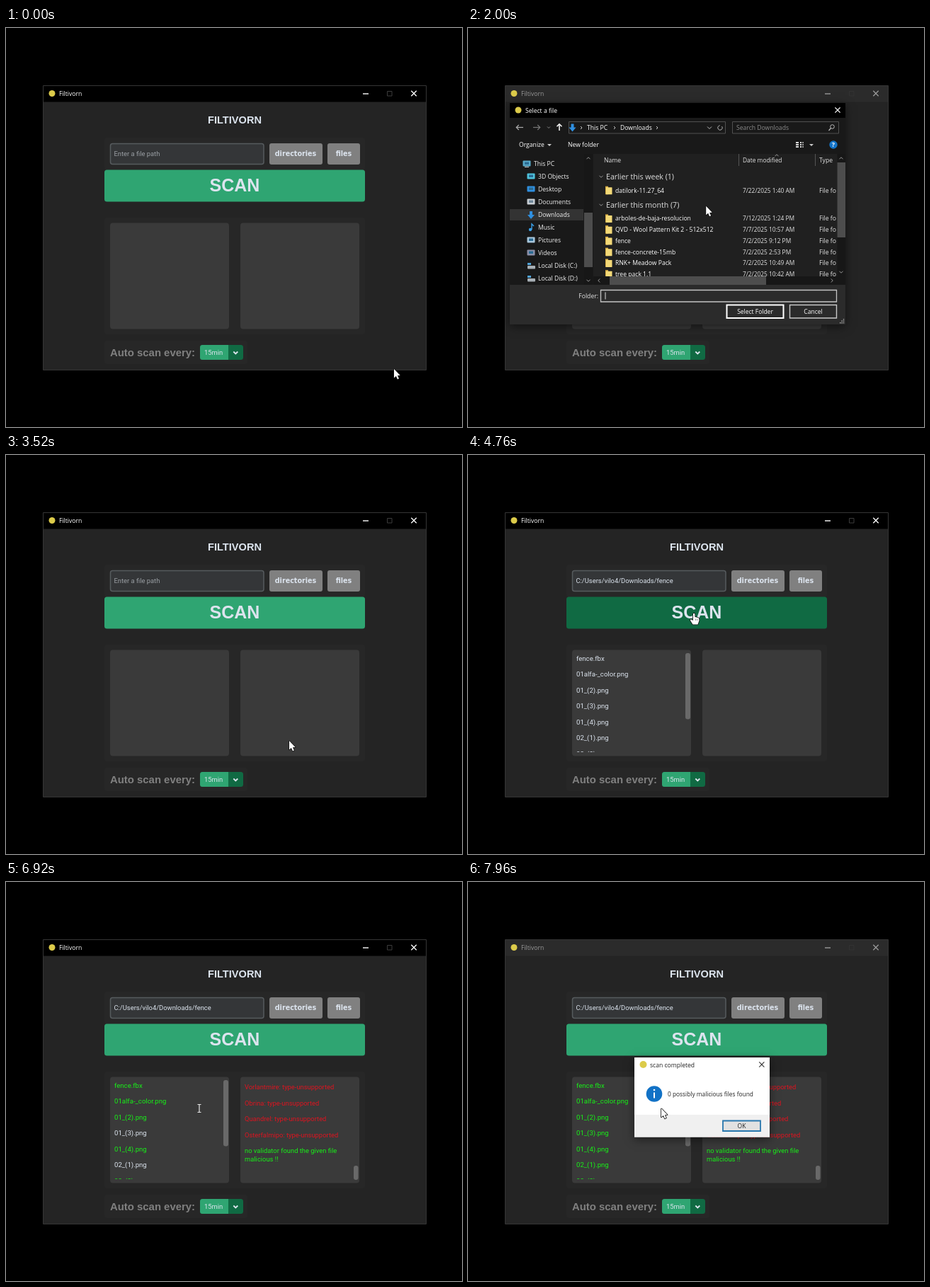
Recreate the animation shown at these times as an HTML page with a canvas. Size 644 by 564 pixels, loop 8000 ms.

```html
<!DOCTYPE html>
<html lang="en">
<head>
<meta charset="utf-8">
<style>
html, body { margin: 0; width: 100%; height: 100%; overflow: hidden; background: #000; }
canvas { display: block; }
</style>
</head>
<body>
<canvas id="stage" width="644" height="564"></canvas>
<script>
const LOOP = 8000, W = 644, H = 564;
const stage = document.getElementById('stage').getContext('2d');
const layer = Object.assign(document.createElement('canvas'), { width: W, height: H }).getContext('2d');
let g = stage;

const APP = '"Roboto", sans-serif';
const HEAD = '"Liberation Sans", Arial, sans-serif';
const WIDE = '"DejaVu Sans", Verdana, sans-serif';
const UI = '"Open Sans", "Noto Sans", sans-serif';
const GREEN = '#2fa572', DARK_GREEN = '#106a43', PALE = '#dce4ee';
const OK_TEXT = '#18f018', BAD_TEXT = '#dc1420';

const clamp = v => Math.max(0, Math.min(1, v));
const smooth = p => p * p * (3 - 2 * p);
const easeOut = p => 1 - (1 - p) ** 3;
const progress = (t, start, length) => clamp((t - start) / length);

function box(x, y, w, h, fill, radius = 0, stroke, line = 1) {
  g.beginPath();
  g.roundRect(x, y, w, h, radius);
  if (fill) { g.fillStyle = fill; g.fill(); }
  if (stroke) { g.strokeStyle = stroke; g.lineWidth = line; g.stroke(); }
}
function text(s, x, y, size, color, family = UI, align = 'left', weight = 400) {
  g.font = `${weight} ${size}px ${family}`;
  g.fillStyle = color;
  g.textAlign = align;
  g.textBaseline = 'alphabetic';
  g.fillText(s, x, y + size * 0.355);
}
function path(points, color, width = 1, fill) {
  g.beginPath();
  points.forEach(([x, y]) => g.lineTo(x, y));
  if (fill) { g.closePath(); g.fillStyle = fill; g.fill(); }
  if (color) { g.strokeStyle = color; g.lineWidth = width; g.stroke(); }
}
function disc(x, y, r, color) {
  g.beginPath();
  g.arc(x, y, r, 0, Math.PI * 2);
  g.fillStyle = color;
  g.fill();
}
function cross(x, y, r, color, width = 1.2) {
  path([[x - r, y - r], [x + r, y + r]], color, width);
  path([[x + r, y - r], [x - r, y + r]], color, width);
}
// Chevron pointing along (dx, dy)
function chevron(x, y, dx, dy, r, color, width = 1) {
  path([[x - dx * r / 2 - dy * r, y - dy * r / 2 - dx * r],
        [x + dx * r / 2, y + dy * r / 2],
        [x - dx * r / 2 + dy * r, y - dy * r / 2 + dx * r]], color, width);
}
function clipped(x, y, w, h, draw) {
  g.save();
  g.beginPath();
  g.rect(x, y, w, h);
  g.clip();
  draw();
  g.restore();
}
// Draws a window as one group: it fades evenly while its growth slows down
function popup(draw, shown, cx, cy) {
  if (shown <= 0) return;
  layer.clearRect(0, 0, W, H);
  g = layer;
  draw();
  g = stage;
  const scale = 0.8 + 0.2 * easeOut(shown);
  g.save();
  g.globalAlpha = shown;
  g.translate(cx, cy);
  g.scale(scale, scale);
  g.drawImage(layer.canvas, -cx, -cy);
  g.restore();
}
function shadowBox(x, y, w, h, fill) {
  g.save();
  g.shadowColor = 'rgba(0,0,0,.5)';
  g.shadowBlur = 12;
  g.shadowOffsetY = 3;
  box(x, y, w, h, fill);
  g.restore();
}

const FILES = ['fence.fbx', '01alfa-_color.png', '01_(2).png', '01_(3).png',
               '01_(4).png', '02_(1).png', '02_(2).png'];
const CHECKED_AT = [5700, 5950, 6250, 7100, 6600, 7500, 6850];
const bad = name => [name + ': type-unsupported', BAD_TEXT];
const good = name => [name + ': undetected', OK_TEXT];
const LOG = [
  ...['Pelmora', 'Drusk', 'Ganverill', 'Othmer', 'Lurabin', 'Kestrolan', 'Wimbra'].map(good),
  ...['Vorlantmire', 'Obrina', 'Quandrel', 'Osterfalmipo'].map(bad),
  ['no validator found the given file', OK_TEXT]
];

function titleBar(active) {
  const ink = active ? '#fff' : '#999';
  box(53, 82, 540, 22.5, active ? '#000' : '#2b2b2b');
  disc(65, 92.5, 4.5, '#dccb4a');
  text('Filtivorn', 75, 93, 8.6, ink);
  path([[504, 93], [512, 93]], ink, 1.4);
  box(538.5, 89.5, 6.5, 6.5, null, 0, active ? '#3c3c3c' : '#333');
  cross(576, 92.5, 3.7, ink, 1.3);
}

function appWindow(t, active, scanHover) {
  box(52.5, 81.5, 541, 402, '#242424', 0, '#353535');
  titleBar(active);
  text('FILTIVORN', 323, 130, 14.6, PALE, HEAD, 'center', 700);

  box(139, 155, 368, 46, '#272727', 4);
  box(147.5, 163.5, 216.5, 29, '#343638', 3, '#565b5e', 1.5);
  const chosen = t >= 3640;
  text(chosen ? 'C:/Users/vilo4/Downloads/fence' : 'Enter a file path', 152.5, 178, 9.4,
       chosen ? PALE : '#9a9fa4', APP);
  box(372, 163, 75, 30, '#808080', 3);
  text('directories', 409, 177.5, 9.6, PALE, WIDE, 'center', 700);
  box(454, 163, 46, 30, '#808080', 3);
  text('files', 477, 177.5, 9.6, PALE, WIDE, 'center', 700);

  box(139, 200.5, 368, 45, scanHover ? DARK_GREEN : GREEN, 3.5);
  text('SCAN', 323, 222, 25, PALE, HEAD, 'center', 700);

  box(139, 268, 368, 165, '#272727', 4);
  box(147, 275.5, 168, 150, '#3a3a3a', 4);
  box(331, 275.5, 168, 150, '#3a3a3a', 4);
  if (chosen) fileList(t);
  scanLog(t);

  box(139, 442, 202, 33, '#272727', 4);
  text('Auto scan every:', 147, 458.5, 14.9, '#808080', HEAD, 'left', 700);
  box(274, 448, 61, 21, DARK_GREEN, 3.5);
  box(274, 448, 40, 21, GREEN, [3.5, 0, 0, 3.5]);
  text('15min', 280, 458.5, 9.4, PALE, APP);
  chevron(324.3, 459, 0, 1, 3, PALE, 1.8);
}

function fileList(t) {
  clipped(147, 276, 160, 144, () => FILES.forEach((name, i) =>
    text(name, 153, 287.5 + i * 22.5, 9.6, t >= CHECKED_AT[i] ? OK_TEXT : PALE, APP)));
  box(307, 280, 7, 93.5, '#696969', 3);
}

function scanLog(t) {
  const count = Math.floor(progress(t, 5600, 1240) * LOG.length);
  if (!count) return;
  LOG.slice(0, count).slice(-5).forEach(([line, color], i) =>
    text(line, 337, 290 + i * 22.5, 9.4, color, APP));
  if (count === LOG.length) text('malicious !!', 337, 391.5, 9.4, OK_TEXT, APP);
  if (count > 5) {
    const thumb = 20 + 100 * (1 - progress(count, 5, LOG.length - 5));
    box(491, 421 - thumb, 6.5, thumb, '#696969', 3);
  }
}

const PLACES = [['This PC', '#58a9c9'], ['3D Objects', '#4fc3dc'], ['Desktop', '#2f8fe0'],
  ['Documents', '#c8ced4'], ['Downloads', '#2f8fe0'], ['Music', '#3aa0e8'], ['Pictures', '#a9c7dc'],
  ['Videos', '#8b8fa8'], ['Local Disk (C:)', '#a8b0b6'], ['Local Disk (D:)', '#a8b0b6']];
const FOLDERS = [
  ['datilork-11.27_64', '7/22/2025 1:40 AM', 229.7],
  ...[['arboles-de-baja-resolucion', '7/12/2025 1:24 PM'],
      ['QVD - Wool Pattern Kit 2 - 512x512', '7/7/2025 10:57 AM'],
      ['fence', '7/2/2025 9:12 PM'],
      ['fence-concrete-15mb', '7/2/2025 2:53 PM'],
      ['RNK+ Meadow Pack', '7/2/2025 10:49 AM'],
      ['tree pack 1.1', '7/2/2025 10:42 AM']].map(([n, d], i) => [n, d, 269.4 + i * 15.75])];

function downArrow(x, y) {
  path([[x - 2, y - 5], [x + 2, y - 5], [x + 2, y], [x + 5, y], [x, y + 6], [x - 5, y], [x - 2, y]],
       null, 0, '#2f8fe0');
}

function placeIcon(i, x, y, color) {
  if (i === 4) return downArrow(x, y);
  if (i === 5) {
    disc(x - 1, y + 3, 2.2, color);
    return path([[x + 1, y + 3], [x + 1, y - 5], [x + 4, y - 2]], color, 1.4);
  }
  if (i > 7) {
    box(x - 5, y, 11, 4.5, color, 1);
    return box(x - 5, y - 4, 5, 3, '#4fa3d8');
  }
  box(x - 5.5, y - 4.5, 11, 8, color, 1);
  box(x - 3, y - 2.5, 6, 3.5, i === 3 ? '#6f8799' : '#2b6b93');
  if (i === 0) box(x - 3, y + 4, 6, 1, '#ccc');
}

function dialogHeader() {
  box(59, 106, 474, 21, '#000');
  disc(71, 116, 4.5, '#dccb4a');
  text('Select a file', 81, 116.5, 8.6, '#fff');
  cross(522, 116, 3.6, '#fff', 1.3);

  [[73, -1, '#aaa'], [96, 1, '#777']].forEach(([x, d, c]) => {
    const tip = x + (d > 0 ? 5 : -4);
    path([[x - 4, 140.5], [x + 5, 140.5]], c, 1.2);
    chevron(tip - d, 140.5, d, 0, 3.5, c, 1.2);
  });
  chevron(114, 140.5, 0, 1, 2, '#888');
  path([[129, 145], [129, 136]], '#fff', 1.5);
  chevron(129, 137.5, 0, -1, 3.5, '#fff', 1.5);
  box(142.5, 132.5, 221, 16.5, null, 0, '#505050');
  box(373.5, 132.5, 150, 16.5, null, 0, '#505050');
  downArrow(147.5, 140.5);
  text('This PC', 168, 141, 8.6, '#fff');
  text('Downloads', 215, 141, 8.6, '#fff');
  [160, 207, 267].forEach(x => chevron(x, 141, 1, 0, 2, '#ccc'));
  chevron(341, 141, 0, 1, 3, '#bbb');
  g.beginPath();
  g.arc(356, 141, 3.2, -0.6, 4.6);
  g.strokeStyle = '#bbb';
  g.stroke();
  text('Search Downloads', 379, 141, 8.6, '#8a8a8a');
  g.beginPath();
  g.arc(514.5, 139.5, 2.8, 0, 7);
  g.stroke();
  path([[512.5, 141.5], [509.5, 145]], '#bbb', 1.2);

  text('Organize', 72, 164.5, 8.6, '#fff');
  path([[112, 164], [118, 164], [115, 167]], null, 0, '#ccc');
  text('New folder', 141, 164.5, 8.6, '#fff');
  for (let y = 161; y < 170; y += 3) {
    box(463, y, 4, 2, '#ddd');
    box(469, y, 2, 2, '#ddd');
    box(472, y, 2, 2, '#999');
  }
  path([[482, 164], [488, 164], [485, 167]], null, 0, '#ccc');
  disc(516, 165, 5.7, '#1374c9');
  text('?', 516, 165, 9, '#fff', UI, 'center', 700);
}

function sidebar() {
  clipped(59, 178, 118, 185, () => {
    box(59, 256, 104, 16, '#333');
    PLACES.forEach(([name, color], i) => {
      const y = 192 + i * 18, indent = i ? 6 : 0;
      placeIcon(i, 83 + indent, y, color);
      text(name, 93 + indent, y - 0.2, 8.6, '#f2f2f2');
    });
  });
  box(164, 178, 12, 185, '#171717');
  box(164, 261, 12, 77, '#4d4d4d');
  chevron(170, 184, 0, -1, 2.5, '#999');
  chevron(170, 357, 0, 1, 2.5, '#999');
}

function folderList(selected, hovered) {
  box(177, 178, 345, 185, '#202020');
  text('Name', 192, 187, 8.6, '#e4e4e4');
  text('Date modified', 388, 187, 8.4, '#e4e4e4');
  text('Type', 496, 187, 8.6, '#e4e4e4');
  path([[382.5, 178], [382.5, 195]], '#555');
  path([[490.5, 178], [490.5, 195]], '#555');
  chevron(436, 180, 0, -1, 2.5, '#999');

  [['Earlier this week (1)', 210], ['Earlier this month (7)', 250]].forEach(([label, y]) => {
    chevron(188, y, 0, 1, 2.5, '#999');
    text(label, 195, y, 10.6, '#dedede');
  });
  clipped(177, 195, 344, 156, () => FOLDERS.forEach(([name, date, y]) => {
    if (name === selected) box(190.5, y - 7.5, 330, 15, '#777', 0, '#999');
    else if (name === hovered) box(190, y - 8, 331, 16, '#4d4d4d');
    box(194, y - 6, 4, 11.5, '#d9ae45');
    box(195, y - 4.5, 8.5, 10, '#f3d978', 0.5);
    text(name, 208, y, 8.6, '#fff');
    text(date, 388, y, 8.35, '#e4e4e4');
    text('File fo', 496, y, 8.6, '#e4e4e4');
  }));

  box(521.5, 178, 11.5, 185, '#171717');
  box(521.5, 190, 11.5, 106, '#4d4d4d');
  chevron(527, 184, 0, -1, 2.5, '#999');
  chevron(527, 345, 0, 1, 2.5, '#999');
  box(177, 351, 345, 12, '#171717');
  box(200, 351, 221, 12, '#4d4d4d');
  chevron(185, 357, -1, 0, 2.5, '#999');
  chevron(514, 357, 1, 0, 2.5, '#999');
}

function fileDialog(t) {
  shadowBox(59, 106, 474, 313, '#191919');
  dialogHeader();
  sidebar();
  const selected = t >= 2240 ? 'fence' : '';
  folderList(selected, t >= 2340 && t < 2940 ? 'fence-concrete-15mb' : t >= 2120 ? 'fence' : '');

  box(59, 363, 474, 56, '#2b2b2b');
  text('Folder:', 184, 379, 8.6, '#e4e4e4', UI, 'right');
  box(187.5, 370.5, 333, 16.5, '#2b2b2b', 0, '#c4c4c4', 1.3);
  if (selected) text(selected, 192, 378.5, 8.6, '#fff');
  else path([[194, 373.5], [194, 383.5]], '#ddd');
  box(365.5, 391.5, 80, 18.5, '#2b2b2b', 0, '#fff', 2);
  text('Select Folder', 405.5, 401, 8.5, '#fff', UI, 'center');
  box(454.5, 391.5, 66, 18.5, '#2b2b2b', 0, '#c8c8c8', 1.4);
  text('Cancel', 487.5, 401, 8.5, '#fff', UI, 'center');
  for (let i = 0; i < 3; i++)
    for (let j = 0; j <= i; j++) box(525 + 2.4 * i, 416 - 2.4 * j, 1.4, 1.4, '#aaa');
}

function tooltip() {
  box(268.5, 328.5, 131.5, 37, '#2b2b2b', 0, '#666');
  ['Date created: 7/2/2025 2:53 PM', 'Size: 15.2 MB', 'Folders: source, textures']
    .forEach((line, i) => text(line, 273, 336 + i * 11.2, 8.35, '#fff'));
}

function messageBox() {
  shadowBox(235, 248, 191, 112.5, '#fff');
  disc(247.5, 258, 5, '#dccb4a');
  text('scan completed', 257, 259, 8.6, '#222');
  cross(414.8, 258, 3.6, '#333', 1.1);
  disc(263, 299.5, 11.3, '#1272c6');
  box(262, 297.5, 2, 8, '#fff');
  disc(263, 294, 1.3, '#fff');
  text('0 possibly malicious files found', 282, 300, 8.35, '#222');
  box(235, 329, 191, 31.5, '#f0f0f0');
  box(360, 337.5, 53, 14.5, '#e1e1e1', 0, '#2877ad', 1.8);
  text('OK', 386.5, 345, 8.5, '#222', UI, 'center');
}

const ROUTE = [[40, 548, 482], [680, 397, 171], [1720, 397, 171], [2200, 300, 300], [2280, 300, 300],
  [2480, 281, 322], [2860, 281, 322], [3120, 400, 404], [3700, 400, 404], [4160, 388, 300],
  [4520, 388, 300], [4740, 319, 224], [5320, 319, 224], [5840, 273, 320], [8000, 273, 320]];

function pointerAt(t) {
  const next = ROUTE.findIndex(([time]) => time > t);
  const [t1, x1, y1] = ROUTE[next], [t0, x0, y0] = ROUTE[Math.max(0, next - 1)];
  const p = t1 > t0 ? smooth(progress(t, t0, t1 - t0)) : 0;
  return [x0 + (x1 - x0) * p, y0 + (y1 - y0) * p];
}

const ARROW = [[0, 0], [0, 12.5], [2.9, 9.9], [4.9, 14.4], [6.9, 13.5], [4.9, 9.2], [8.6, 9]];
const HAND = [[-1, 0], [1.2, 0], [1.5, 5], [4, 5.5], [7, 6.5], [7.5, 10], [5.5, 15.5], [-1.5, 15.5],
              [-5, 10], [-4.5, 8], [-1.2, 10]];

function pointer(x, y, kind) {
  g.save();
  g.translate(x, y);
  g.lineJoin = 'round';
  if (kind === 'beam') {
    path([[0, -5], [0, 5]], '#e6e6e6', 1.2);
    path([[-2.5, -5.5], [2.5, -5.5]], '#e6e6e6');
    path([[-2.5, 5.5], [2.5, 5.5]], '#e6e6e6');
  } else {
    const shape = kind === 'hand' ? HAND : ARROW;
    path([...shape, shape[0]], '#111', 1.6);
    path(shape, null, 0, '#fff');
    if (kind === 'hand') [2.4, 4.8].forEach(dx => path([[dx, 7.5], [dx, 10]], '#555', 0.7));
  }
  g.restore();
}

function pointerKind(t, x, y, modal) {
  const inside = (l, top, r, b) => x >= l && x <= r && y >= top && y <= b;
  if (modal || (t >= 2860 && t < 3720)) return 'arrow';
  if (inside(139, 200, 507, 245) || inside(372, 163, 447, 193)) return 'hand';
  if (inside(147, 276, 315, 425) || inside(331, 276, 499, 425)) return 'beam';
  return 'arrow';
}

function draw() {
  const t = performance.now() % LOOP;
  const dialogShown = progress(t, 1010, 220) * (1 - progress(t, 3200, 140));
  const messageShown = progress(t, 7720, 220);
  const modal = dialogShown > 0 || messageShown > 0;
  const [x, y] = pointerAt(t);
  const kind = pointerKind(t, x, y, modal);

  g.fillStyle = '#000';
  g.fillRect(0, 0, W, H);
  appWindow(t, !modal, kind === 'hand' && y > 200);
  popup(() => fileDialog(t), dialogShown, 296, 262);
  const tip = progress(t, 2600, 100) * (1 - progress(t, 2880, 60));
  if (tip > 0) {
    g.globalAlpha = tip;
    tooltip();
    g.globalAlpha = 1;
  }
  popup(messageBox, messageShown, 330, 304);
  pointer(x, y, kind);
  requestAnimationFrame(draw);
}
draw();
</script>
</body>
</html>
```
